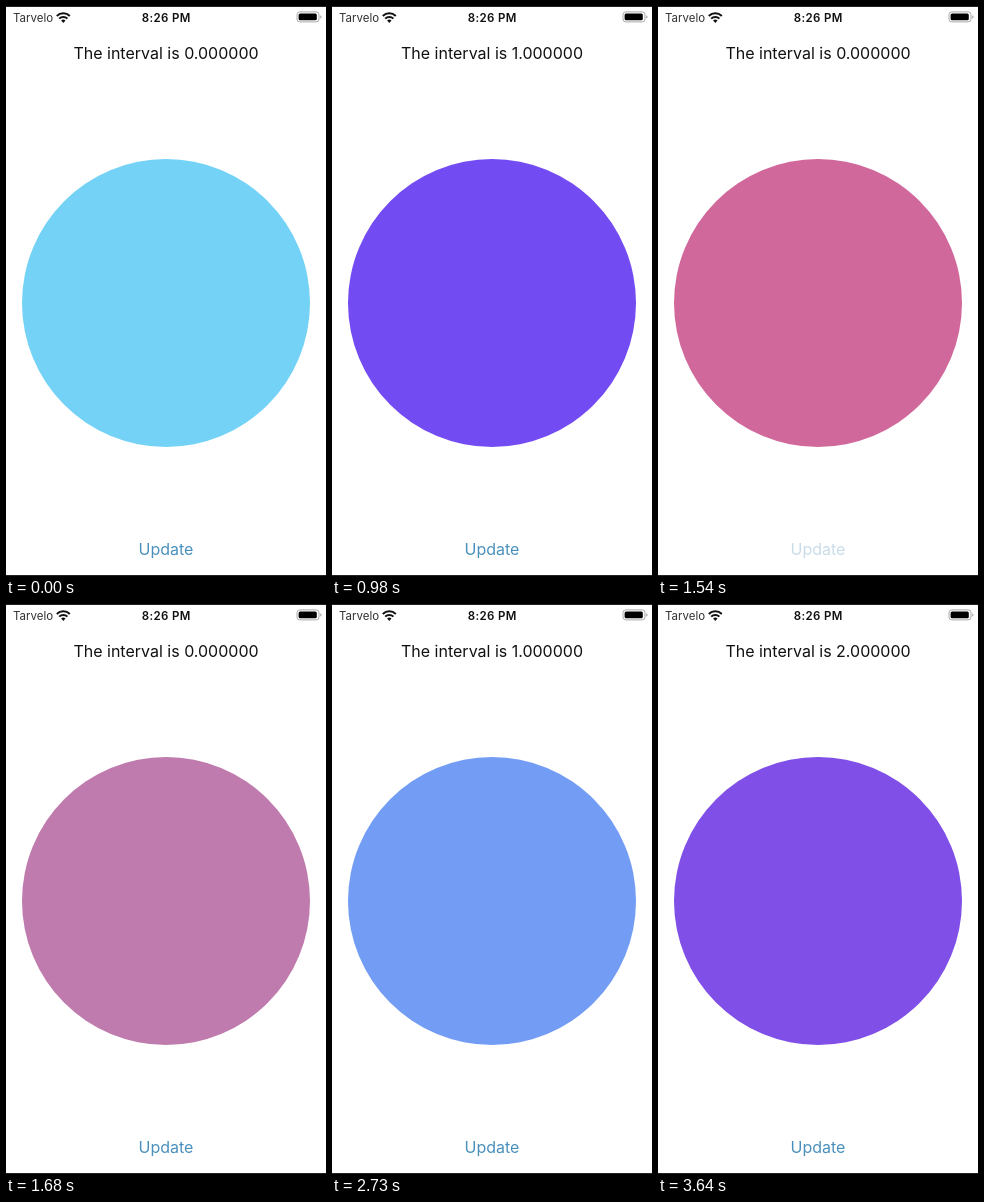
Animation, 320 px wide and 570 px high, one loop 3710 ms. Source, as an HTML page:

```html
<!DOCTYPE html>
<html lang="en">
<head>
<meta charset="utf-8">
<title>Update interval</title>
<style>
  html, body { margin: 0; width: 100%; height: 100%; overflow: hidden; background: #fff; }
  svg { display: block; width: 320px; height: 570px; }
  text { font-family: Inter, "Liberation Sans", sans-serif; }
  .body { font-size: 16px; text-anchor: middle; }
  .status { font-size: 11.5px; }
</style>
</head>
<body>
<svg viewBox="0 0 320 570">
  <rect width="320" height="570" fill="#fff"/>
  <path d="M0 .5H320M0 569.5H320" stroke="#222"/>

  <text class="status" x="7" y="15.5" fill="#333">Tarvelo</text>
  <g fill="none" stroke="#111" stroke-width="2">
    <path d="M50.8 10A9.3 9.3 0 0 1 63.8 10"/>
    <path d="M53.2 12.6A5.8 5.8 0 0 1 61.4 12.6"/>
  </g>
  <path d="M57.3 17L55.1 14.6A3.1 3.1 0 0 1 59.5 14.6Z" fill="#111"/>
  <text class="status" x="160.3" y="15.5" fill="#111" font-weight="600"
        letter-spacing=".35" text-anchor="middle">8:26 PM</text>
  <rect x="291" y="5.9" width="22" height="10" rx="2.8" fill="none" stroke="#aaa"/>
  <rect x="292.6" y="7.5" width="18.2" height="6.8" rx="1.5" fill="#000"/>
  <path d="M314.2 9.2Q315.6 9.8 315.6 10.9T314.2 12.6Z" fill="#aaa"/>

  <text id="label" class="body" x="160" y="53" fill="#111"></text>
  <circle id="disc" cx="160" cy="297" r="144"/>
  <text id="button" class="body" x="160" y="548.6">Update</text>
</svg>
<script>
  const LOOP = 3710, STEP = 70;
  const BLUE = [115, 210, 246], PURPLE = [115, 75, 242], PINK = [208, 104, 157];

  // press and release times in ms, then the state that the release starts
  const taps = [
    { down: 20, up: 87, from: BLUE, to: PURPLE, value: 1 },
    { down: 1040, up: 1115, from: PURPLE, to: PINK, value: 0 },
    { down: 1535, up: 1615, from: PINK, to: BLUE, value: 0 },
    { down: 2515, up: 2621, from: BLUE, to: PURPLE, value: 1 },
    { down: 3495, up: 3588, from: PURPLE, to: PINK, value: 2 }
  ];
  const start = { up: 0, from: BLUE, to: BLUE, value: 0 };

  const [label, disc, button] =
    ["label", "disc", "button"].map(id => document.getElementById(id));

  // damped spring: response 0.55 s, damping ratio 0.825
  function spring(ms) {
    const damping = 0.825;
    const x = 2 * Math.PI / 0.55 * ms / 1000;
    const w = Math.sqrt(1 - damping * damping);
    return 1 - Math.exp(-damping * x) *
      (Math.cos(w * x) + damping / w * Math.sin(w * x));
  }

  function draw(t) {
    const tap = taps.filter(p => p.up <= t).pop() || start;
    const pressed = taps.some(p => p.down <= t && t < p.up);
    const k = spring(t - tap.up);
    const rgb = tap.from.map((c, i) => Math.round(c + (tap.to[i] - c) * k));
    disc.setAttribute("fill", `rgb(${rgb})`);
    button.setAttribute("fill", pressed ? "#c8dce8" : "#4a90bc");
    const text = "The interval is " + tap.value.toFixed(6);
    if (label.textContent !== text) label.textContent = text;
  }

  const origin = performance.now();
  function tick() {
    const t = (performance.now() - origin) % LOOP;
    draw(Math.floor(t / STEP) * STEP);
    requestAnimationFrame(tick);
  }
  tick();
</script>
</body>
</html>
```
